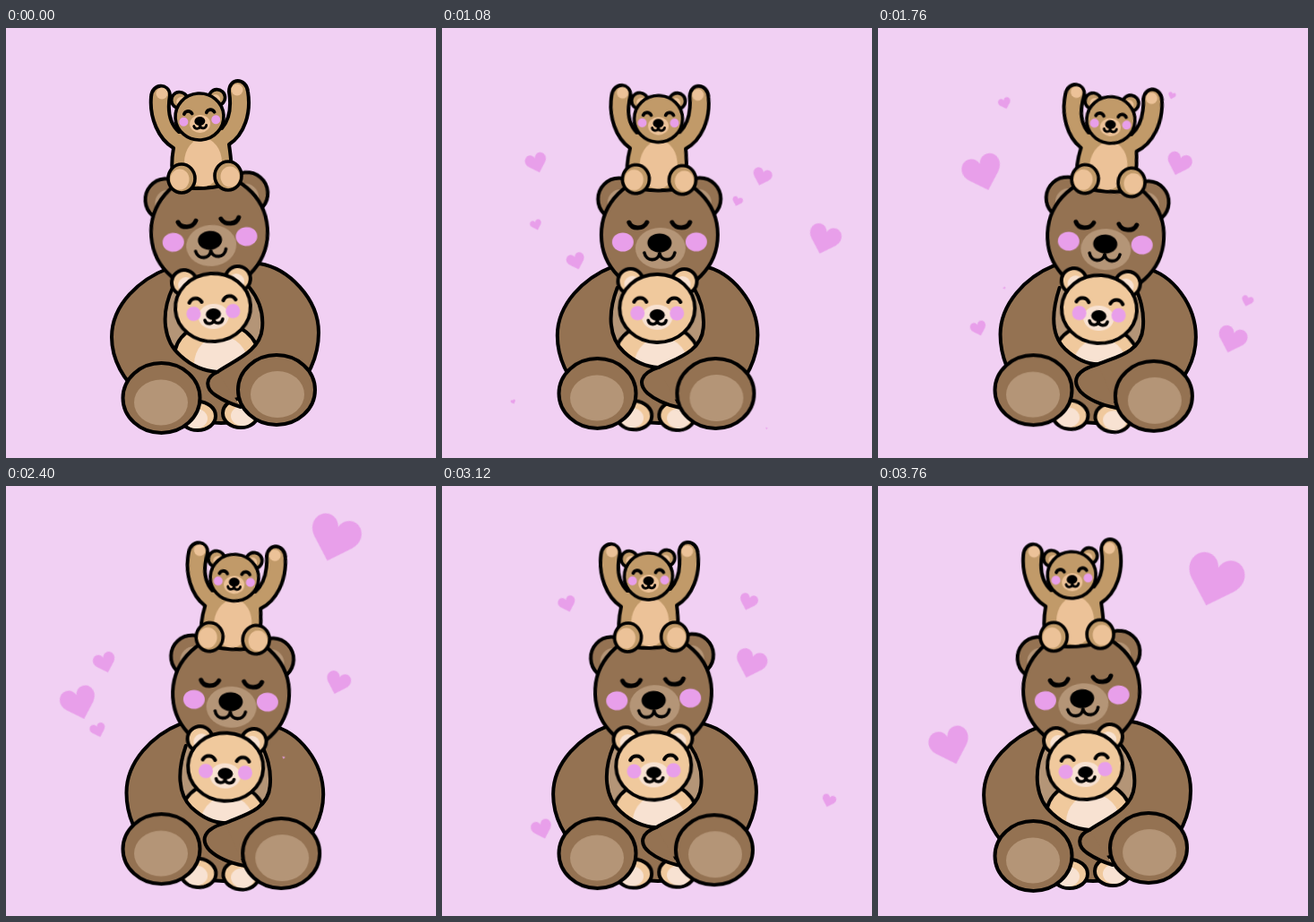
These frames come from a looping animation (480 by 480 pixels, 3800 ms). An HTML page:

```html
<!DOCTYPE html>
<html lang="en">
<head>
<meta charset="utf-8">
<title>Bear hug</title>
<style>
html, body { margin: 0; width: 100%; height: 100%; overflow: hidden; background: #f1d0f3; }
svg { display: block; width: 480px; height: 480px; }

.line { stroke: #000; stroke-width: 4; stroke-linecap: round; stroke-linejoin: round; }
.thin { stroke-width: 3.6; }
.thick { stroke-width: 5; }
.open { fill: none; }
.brown { fill: #947252; }
.pad { fill: #b49577; }
.cream { fill: #f0c99d; }
.milk { fill: #f8e2d2; }
.honey { fill: #c19a69; }
.sand { fill: #ecc298; }
.pink { fill: #e89fea; }

.sway, .bob, .footL, .footR, .body, .lap, .hand {
  animation: 1.9s cubic-bezier(.364, 0, .635, 1) .05s infinite alternate both;
}
.sway { transform-origin: 232px 438px; animation-name: sway; }
.cub { transform-origin: 224px 436px; }
.bob { animation-name: bob; animation-timing-function: cubic-bezier(.2, .6, .4, 1); }
.footL { animation-name: footL; }
.footR { animation-name: footR; }
.body { animation-name: body; }
.lap { animation-name: lap; }
.hand { animation-name: hand; }

@keyframes sway { from { transform: rotate(0deg); } to { transform: rotate(7.6deg); } }
@keyframes bob { from { transform: translateY(0); } to { transform: translateY(3px); } }
@keyframes footL { from { transform: translate(0, 0); } to { transform: translate(0, -9px); } }
@keyframes footR { from { transform: translate(0, 0); } to { transform: translate(6px, 7px); } }
@keyframes body {
  from { d: path("M182 268 C150 280 118 308 118 345 C118 395 170 440 240 441 C300 440 349 395 349 340 C349 302 315 268 283 263 Z"); }
  to { d: path("M197 265 C165 278 137 308 137 342 C137 390 175 440 243 441 C305 440 355 395 355 345 C355 310 330 275 298 268 Z"); }
}
@keyframes lap {
  from { d: path("M186 290 C172 320 176 350 195 366 C208 378 222 383 236 384 C252 372 284 362 286 335 C288 315 280 300 272 290"); }
  to { d: path("M203 290 C194 318 194 343 209 358 C222 370 234 375 246 375 C266 367 294 362 296 335 C298 315 292 300 288 290"); }
}
@keyframes hand {
  from { d: path("M236 384 C222 390 222 402 234 410 C243 416 252 420 262 423"); }
  to { d: path("M246 375 C220 382 216 394 226 406 C236 416 250 421 266 424"); }
}
</style>
</head>
<body>
<svg viewBox="0 0 480 480">
  <defs>
    <clipPath id="lapClip"><path class="lap"/></clipPath>
    <path id="heart" d="M0 .46 L-.4 .07 C-.62 -.17 -.46 -.45 -.25 -.45 C-.12 -.45 -.03 -.36 0 -.25 C.03 -.36 .12 -.45 .25 -.45 C.46 -.45 .62 -.17 .4 .07 Z"/>

    <!-- left halves, mirrored where used -->
    <g id="bigEar">
      <circle class="line brown" cx="-45" cy="-40" r="23.5"/>
      <circle class="pad" cx="-43" cy="-36" r="15"/>
    </g>
    <g id="bigSide">
      <ellipse class="pink" cx="-41" cy="8" rx="12" ry="10.5"/>
      <path class="line thick open" d="M-34 -14 C-31 -6 -18 -6 -14 -14"/>
      <path class="line thin open" d="M-17 20 C-15 30 -2 30 0 21"/>
    </g>
    <g id="cubEar">
      <circle class="line cream" cx="-30" cy="-30" r="14"/>
      <circle class="milk" cx="-28" cy="-27" r="9"/>
    </g>
    <g id="cubSide">
      <circle class="pink" cx="-22" cy="5.5" r="8"/>
      <path class="line open" d="M-26 -7 C-23 -13 -15 -13 -12 -7"/>
      <path class="line thin open" d="M-10 13.5 C-9 19 -1 19 0 14"/>
    </g>
    <g id="topEar">
      <circle class="line thin honey" cx="-21" cy="-20" r="9"/>
      <circle class="sand" cx="-19" cy="-18" r="5.5"/>
    </g>
    <g id="topSide">
      <circle class="pink" cx="-18" cy="4.5" r="5"/>
      <path class="line thin open" d="M-17 -4 C-15 -8 -10 -8 -8 -4"/>
      <path class="line open" style="stroke-width:2.8" d="M-7 10 C-6 14 -1 14 0 10.5"/>
    </g>
    <g id="topFoot">
      <ellipse class="line thin honey" rx="15" ry="16"/>
      <ellipse class="sand" cx="-2" cy="1" rx="10.5" ry="11.5"/>
    </g>
    <g id="cubFoot">
      <ellipse class="line cream" rx="20" ry="16"/>
      <ellipse class="milk" cx="-2" cy="3" rx="13" ry="11"/>
    </g>
  </defs>
  <rect width="480" height="480" fill="#f1d0f3"/>

  <!-- big body and the cub's torso -->
  <path class="body line brown"/>
  <path class="lap pad"/>
  <g clip-path="url(#lapClip)">
    <g class="sway cub">
      <ellipse class="line cream" cx="235" cy="367" rx="47" ry="39"/>
      <ellipse class="milk" cx="240" cy="375" rx="30" ry="31"/>
    </g>
  </g>
  <path class="lap line open"/>
  <g class="sway cub">
    <use href="#cubFoot" x="214" y="433"/>
    <use href="#cubFoot" transform="translate(262 430) scale(-1 1)"/>
  </g>
  <path class="hand line brown"/>

  <g class="footL">
    <ellipse class="line brown" cx="173.5" cy="413" rx="43" ry="39"/>
    <ellipse class="pad" cx="173" cy="418" rx="30" ry="25.5"/>
  </g>
  <g class="footR">
    <ellipse class="line brown" cx="302" cy="404" rx="43" ry="39"/>
    <ellipse class="pad" cx="303" cy="409" rx="30" ry="26"/>
  </g>

  <g class="bob"><g class="sway">
    <g transform="translate(227 228) rotate(-4.5)">
      <use href="#bigEar"/><use href="#bigEar" transform="scale(-1 1)"/>
      <circle class="line brown" r="65"/>
      <ellipse class="pad" cx="1" cy="15" rx="28" ry="23"/>
      <use href="#bigSide"/><use href="#bigSide" transform="scale(-1 1)"/>
      <ellipse cy="9" rx="13.5" ry="10.5"/>
    </g>
  </g></g>

  <!-- cub in the lap -->
  <g class="sway cub">
    <g transform="translate(231 312) rotate(-4)">
      <use href="#cubEar"/><use href="#cubEar" transform="scale(-1 1)"/>
      <ellipse class="line cream" rx="42" ry="38"/>
      <ellipse class="milk" cy="10" rx="17" ry="14"/>
      <use href="#cubSide"/><use href="#cubSide" transform="scale(-1 1)"/>
      <ellipse cy="7.5" rx="8.5" ry="6.5"/>
    </g>
  </g>

  <!-- cub on top -->
  <g class="bob"><g class="sway">
    <path class="line honey" d="M188 177 C184 160 185 145 187 134 C170 124 160 100 162 77 C163 61 182 61 183 75 C180 92 182 106 193 116 L241 112 C248 104 252 90 249 71 C249 55 268 55 270 71 C274 95 266 119 249 130 C251 144 253 158 250 174 Q220 182 188 177 Z"/>
    <ellipse class="sand" cx="220" cy="150" rx="21" ry="27"/>
    <circle class="sand" cx="174" cy="73" r="6.5"/>
    <circle class="sand" cx="258" cy="69" r="6.5"/>
    <use href="#topFoot" x="196" y="168"/>
    <use href="#topFoot" transform="translate(248 165) scale(-1 1)"/>
    <g transform="translate(216 99) rotate(-4)">
      <use href="#topEar"/><use href="#topEar" transform="scale(-1 1)"/>
      <ellipse class="line thin honey" rx="27" ry="26"/>
      <ellipse class="sand" cy="8" rx="11.5" ry="10"/>
      <use href="#topSide"/><use href="#topSide" transform="scale(-1 1)"/>
      <ellipse cy="5" rx="6" ry="5"/>
    </g>
  </g></g>

  <g id="hearts" class="pink"></g>
</svg>
<script>
const LOOP = 3800, BEAT = 108, SHORT = 810, LONG = 1470;
const RISE = 145, DRIFT = 48; // px/s
const layer = document.getElementById('hearts');

// A heart grows from nothing while it rises and drifts outward, then vanishes.
function addHeart(birth, x, y, life) {
  const side = x < 240 ? -1 : 1;
  const grow = 39 + 5 * side;
  const end = Math.min(birth + life, LOOP);
  const pose = (s, size) =>
    `translate(${x + side * DRIFT * s}px, ${y - RISE * s}px) rotate(${18 * side}deg) scale(${size})`;
  const age = (end - birth) / 1000;
  const start = pose(0, 0), gone = pose(age, 0);

  const el = document.createElementNS('http://www.w3.org/2000/svg', 'use');
  el.setAttribute('href', '#heart');
  layer.append(el);
  el.animate([
    { offset: 0, transform: start },
    { offset: birth / LOOP, transform: start },
    { offset: end / LOOP, transform: pose(age, grow * age) },
    { offset: end / LOOP, transform: gone },
    { offset: 1, transform: gone }
  ], { duration: LOOP, iterations: Infinity });
}

// One heart per beat, each from its own starting point.
function burst(from, starts) {
  starts.forEach(([x, y, life = SHORT], i) => addHeart(from + i * BEAT, x, y, life));
}

burst(60, [
  [142, 326], [354, 285], [388, 353], [139, 252], [178, 346, LONG], [334, 236],
  [123, 274], [317, 232], [87, 440], [360, 454], [306, 242, LONG], [137, 410, LONG],
  [161, 143], [398, 348], [319, 103], [145, 302], [341, 309], [127, 346]
]);
burst(2340, [[307, 312, LONG], [144, 481, LONG], [167, 214], [320, 196], [415, 402]]);
</script>
</body>
</html>
```
